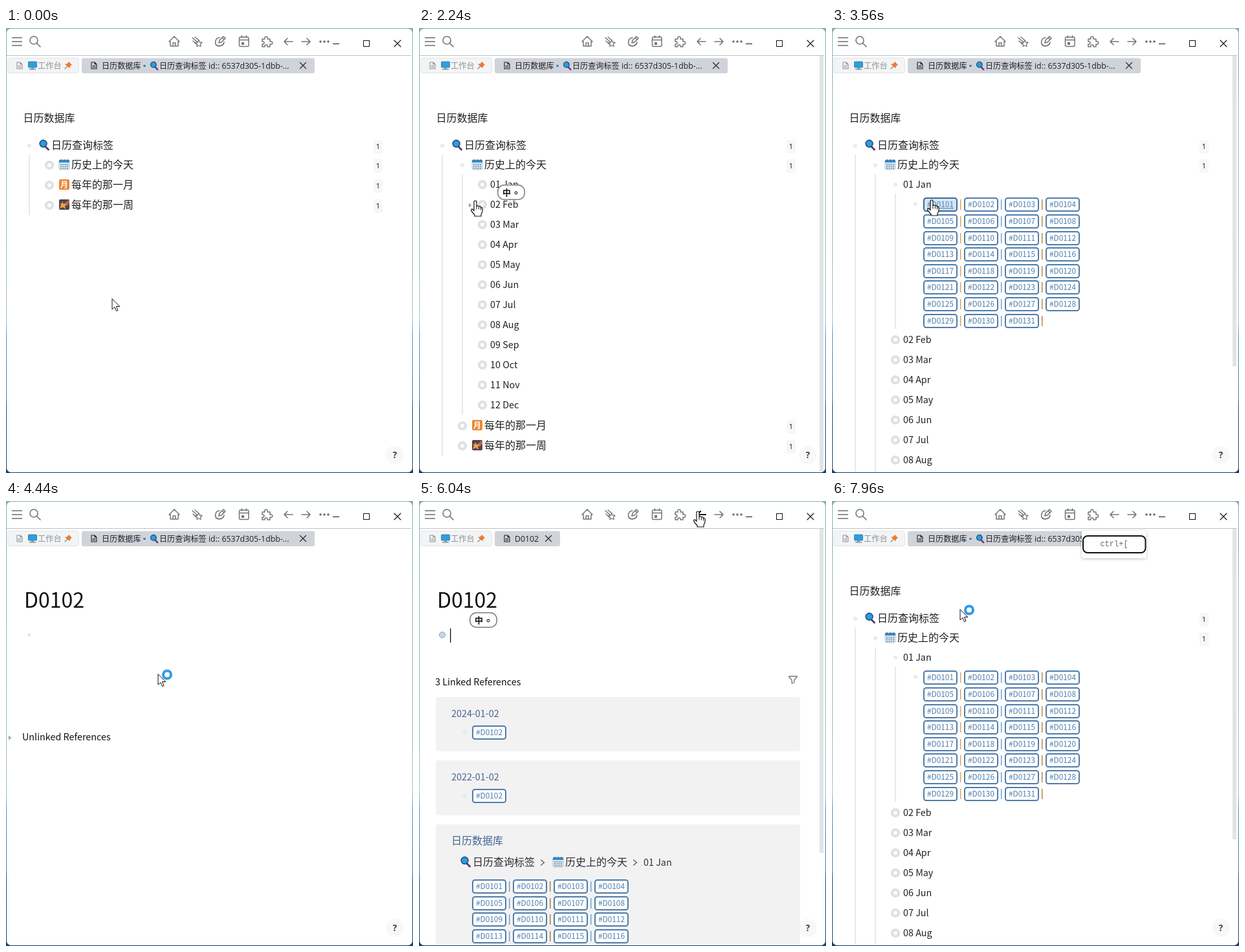
Write an HTML page with a canvas that moves like this. It is 629 by 688 pixels and loops after 8000 ms.

```html
<!DOCTYPE html>
<html lang="zh-CN">
<head>
<meta charset="utf-8">
<style>
html, body { margin: 0; width: 100%; height: 100%; overflow: hidden; background: #fff; }
canvas { display: block; width: 629px; height: 688px; }
</style>
</head>
<body>
<canvas id="stage" width="629" height="688"></canvas>
<script>
const ctx = document.getElementById('stage').getContext('2d');
const LOOP = 8000;
const SANS = '"Noto Sans CJK SC", "Noto Sans CJK", sans-serif';
const UI = '"Open Sans", "Noto Sans CJK SC", sans-serif';
const LATIN = 14.35;
const GREY = '#757575', INK = '#202124', BLUE = '#4f7dab';
const MONTHS = 'Jan Feb Mar Apr May Jun Jul Aug Sep Oct Nov Dec'.split(' ');

const pad = n => String(n).padStart(2, '0');
const monthName = i => pad(i + 1) + ' ' + MONTHS[i];
const within = (t, a, b) => t >= a && t < b;

function text(s, x, y, size, color = INK, font = SANS, weight = 400, align = 'left') {
  ctx.font = `${weight} ${size}px ${font}`;
  ctx.fillStyle = color;
  ctx.textAlign = align;
  ctx.fillText(s, x, y);
}
function rect(x, y, w, h, color) {
  ctx.fillStyle = color;
  ctx.fillRect(x, y, w, h);
}
function box(x, y, w, h, r, fill, stroke, width = 1) {
  ctx.beginPath();
  ctx.roundRect(x, y, w, h, r);
  if (fill) { ctx.fillStyle = fill; ctx.fill(); }
  if (stroke) { ctx.strokeStyle = stroke; ctx.lineWidth = width; ctx.stroke(); }
}
function dot(x, y, r, fill, stroke, width = 1) {
  ctx.beginPath();
  ctx.arc(x, y, r, 0, 7);
  if (fill) { ctx.fillStyle = fill; ctx.fill(); }
  if (stroke) { ctx.strokeStyle = stroke; ctx.lineWidth = width; ctx.stroke(); }
}
// SVG path placed at x, y
function shape(d, x, y, fill, stroke, width = 1.5, scale = 1) {
  ctx.save();
  ctx.translate(x, y);
  ctx.scale(scale, scale);
  const p = new Path2D(d);
  ctx.lineJoin = ctx.lineCap = 'round';
  if (fill) { ctx.fillStyle = fill; ctx.fill(p); }
  if (stroke) { ctx.strokeStyle = stroke; ctx.lineWidth = width; ctx.stroke(p); }
  ctx.restore();
}

// Small pictograms, centred on x, y
function magnifier(x, y, s = 1) {
  shape('M2.5 3L6.5 7', x, y, null, '#5b3f73', 3, s);
  shape('M4-2.2A5.4 5.4 0 1 1-6.8-2.2A5.4 5.4 0 1 1 4-2.2Z', x, y, '#279ee0', '#234c7d', 1.6, s);
}
function calendar(x, y) {
  box(x - 8, y - 7, 16, 15, 2, '#dceaf4', '#a8bccb', .8);
  rect(x - 8, y - 7, 16, 4, '#2f8fd0');
  for (let i = 0; i < 12; i++)
    rect(x - 6 + (i % 4) * 3.3, y - 1 + Math.floor(i / 4) * 3, 2, 1.8, '#7894a8');
  for (const dx of [-5, 0, 5]) rect(x + dx - .5, y - 8, 1.2, 3, '#52616c');
}
function monthBadge(x, y) {
  box(x - 8, y - 8, 16, 16, 2, '#ef8730');
  text('月', x, y + 4.5, 12, '#fff', SANS, 700, 'center');
}
function shootingStar(x, y) {
  box(x - 8, y - 8, 16, 16, 2, '#51405f');
  shape('M0-2L8-8V-2L3 3Z', x, y, '#b8673d');
  shape('M-3-5L-1-1L4-1L1 2L2 7L-2 4L-7 6L-5 1L-7-2L-4-1Z', x, y, '#f5a435');
}
function computer(x, y) {
  box(x - 6.5, y - 6, 13, 9, 1, '#2c9fe0', '#3d7190', .8);
  rect(x - 2, y + 3, 4, 2, '#8a9aa4');
  rect(x - 5, y + 5, 10, 1.5, '#7197ae');
}
function pin(x, y) {
  shape('M-1 1L-5 5', x, y, null, '#888', 1.2);
  shape('M1-6L6-1L4 0L2 4L-5-2L-1-3Z', x, y, '#ed7b32');
}
const page = (x, y, c) =>
  shape('M-4-5H1L4-2V5H-4ZM1-5V-2H4M-2 .5H2M-2 2.7H2', x, y, null, c, 1.1);

function bullet(x, y, collapsed) {
  if (collapsed) dot(x, y, 5.1, '#fbfbfc', '#dee0e5', 4);
  else dot(x, y, 3, '#e9eaed');
}
function count(y) {
  box(568, y - 10, 14, 21, 3, '#f7f7f7');
  text('1', 575, y + 4, 11, '#111', UI, 400, 'center');
}
function topic(icon, label, x, y, collapsed) {
  bullet(x, y + 1, collapsed);
  icon(x + 23, y);
  text(label, x + 34, y + 6, 16);
  count(y + 2);
}
function month(i, y, collapsed = true) {
  bullet(98, y, collapsed);
  text(monthName(i), 110, y + 5, LATIN);
}
function tag(day, x, y, hover) {
  box(x + 1, y - 10, 51, 20, 3.5, hover ? '#d6e6f2' : '#fff', hover ? '#3c6b9d' : BLUE, 2);
  text('#D01' + pad(day), x + 26.5, y + 4, 11.85, BLUE, SANS, 400, 'center');
  if (hover) rect(x + 6, y + 5.5, 41, 1, BLUE);
}
function tagGrid(x, y, days, bars, hover) {
  for (let i = 0; i < days; i++) {
    const cx = x + (i % 4) * 63, cy = Math.round(y + Math.floor(i / 4) * 25.6);
    tag(i + 1, cx, cy, hover === i + 1);
    if (i % 4 < 3) rect(cx + 57, cy - 8, 1.4, 16, bars[i % 4]);
  }
}
const guide = (x, top, bottom) => rect(x - 1, top, 2, bottom - top, '#e9e9eb');
const thumb = bottom => rect(619, 43, 6, bottom - 43, '#e2e3e5');
const triangle = (x, y, open) =>
  shape(open ? 'M-3-2H3L0 3Z' : 'M-2-3.5V3.5L2.5 0Z', x, y, '#a5a5a8');

function databasePage(level, t) {
  text('日历数据库', 26.5, 145, 16);
  guide(36, 196, [289, 661, 687][level]);
  bullet(36, 182);
  magnifier(59, 181);
  text('日历查询标签', 70, 187, 16);
  count(183);
  topic(calendar, '历史上的今天', 67, 211, level === 0);
  if (level < 2) {
    const y = level ? 614 : 242;
    topic(monthBadge, '每年的那一月', 67, y, true);
    topic(shootingStar, '每年的那一周', 67, y + 31, true);
  }
  if (level) guide(67, 226, level === 1 ? 598 : 687);
  if (level === 1) {
    for (let i = 0; i < 12; i++) month(i, 242 + i * 31);
    thumb(685);
  }
  if (level === 2) {
    month(0, 242, false);
    guide(98, 256, 465);
    bullet(129, 272);
    const hover = within(t, 3480, 3850) ? 1 : within(t, 3920, 4250) ? 2 : 0;
    tagGrid(141, 273.4, 31, ['#dfa04a', '#6a9bcb', '#b08434'], hover);
    for (let i = 1; i < 8; i++) month(i, 451 + i * 31);
    thumb(523);
  }
}

function tagPage(t) {
  text('D0102', 28, 165, 32, '#111', SANS, 300);
  const editing = t >= 4870;
  if (editing) {
    dot(36, 207, 4.5, '#c5d8ef', '#8197bb', 1);
    if (Math.floor((t - 4870) / 530) % 2 === 0) rect(48, 197, 1.3, 22, '#111');
  } else dot(36, 207, 2.7, '#e6e7ea');
  if (t < 4620) {
    triangle(6, 366);
    text('Unlinked References', 25, 370, LATIN, '#111');
    return;
  }
  const loaded = t >= 5010;
  text('3 Linked References', 25, 285, LATIN, '#111');
  shape('M-6-5H6V-4L1.8 1V4.5L-1.8 6V1L-6-4Z', 578, 276, null, GREY, 1.3);
  [[303, 84], [401, 85], [500, 187]].forEach(([y, h]) => box(26, y, 563, h, 4, '#f2f2f2'));
  [['2024-01-02', 329], ['2022-01-02', 427]].forEach(([date, y]) => {
    text(date, 50, y + 5, LATIN, '#48638e');
    if (loaded) { bullet(70, y + 29); tag(2, 82, y + 29); }
  });
  text('日历数据库', 50, 531, 16, '#45658f');
  thumb(loaded ? 544 : 640);
  if (!loaded) return;
  magnifier(72, 558);
  text('日历查询标签', 83, 564, 16, '#2d3037');
  calendar(215, 558);
  text('历史上的今天', 226, 564, 16, '#2d3037');
  for (const x of [191, 334]) shape('M-2.5-4L2.5 0L-2.5 4', x, 559, null, '#555', 1.3);
  text('01 Jan', 347, 564, LATIN, '#2d3037');
  tagGrid(82, 596, 16, ['#6d9dca', '#b4793c', '#6d9dca']);
}

function toolbar(t) {
  for (const y of [15, 21, 27]) rect(9, y - .75, 16, 1.6, GREY);
  dot(43, 19, 6, null, GREY, 1.6);
  shape('M47.5 23.5L53 29', 0, 0, null, GREY, 1.7);
  shape('M-8 0L0-8L8 0H6V7H-6V0ZM-2 7V2H2V7', 260, 21, null, GREY);
  shape('M-7-6L1 1M-3-7L3-2M-6-1L-1 4', 295, 21, null, GREY);
  shape('M3-2L4.5 1L8 1.5L5.5 4L6 7.5L3 6L0 7.5L.5 4L-2 1.5L1.5 1Z', 295, 21, '#fff', GREY, 1.3);
  shape('M-2 2L-1-2L5-8L8-5L2 1ZM-1-6C-7-6-8 0-7 4C-4 9 5 7 6 1M3-6L6-3', 331, 21, null, GREY, 1.6);
  box(360.5, 14, 14.5, 14.5, 2, null, GREY, 1.5);
  shape('M-7-2.5H7M-3.5-9V-6M3.5-9V-6', 368, 21, null, GREY);
  rect(364, 22, 4, 4, GREY);
  shape('M-7-4H-3C-5-9 3-9 1-4H5V0C10-2 10 6 5 4V8H1C2 4-4 4-3 8H-7V4C-3 5-3-1-7 0Z', 403, 21, null, GREY);
  const hot = within(t, 5950, 7780);
  shape('M7 0H-6M-1-5L-6 0L-1 5', 436, 21, null, hot ? '#111' : GREY, hot ? 2.2 : 1.6);
  shape('M-7 0H6M1-5L6 0L1 5', 464, 21, null, GREY, 1.6);
  for (const x of [486, 492, 498]) dot(x, 21, 1.7, '#666');
  rect(505, 24, 10, 1, '#111');
  ctx.strokeStyle = '#111';
  ctx.lineWidth = 1;
  ctx.strokeRect(552.5, 19.5, 9, 9);
  shape('M600 19L610 29M610 19L600 29', 0, 0, null, '#111', 1.1);
  rect(1, 42, 625, 1, '#bfc1c3');
}

function tabs(t) {
  box(2.5, 46.5, 110, 23, 3, '#f3f4f5', '#e3e4e6');
  page(21, 58, '#909398');
  computer(41, 58);
  text('工作台', 49, 63, 12.3, '#8d9198');
  pin(96, 58);
  const short = within(t, 4750, 7150);
  box(117, 46.5, short ? 101 : 360, 23.5, 3, '#d0d3da');
  page(136, 58, '#222');
  if (short) text('D0102', 148, 63, 12.3, INK, UI);
  else {
    text('日历数据库', 148, 63, 12.1);
    dot(214, 58.5, 1.8, '#2982b8');
    magnifier(229, 58.5, .8);
    text('日历查询标签', 237, 63, 12.1);
    text('id:: 6537d305-1dbb-...', 313, 63, 12.3, INK, UI);
  }
  shape('M-4.5-4.5L4.5 4.5M4.5-4.5L-4.5 4.5', short ? 200 : 459, 58, null, '#333', 1.4);
}

function desktop() {
  const g = ctx.createLinearGradient(0, 0, 0, 688);
  [[0, '#86aeb3'], [.66, '#9fc0cc'], [.69, '#4d92c2'], [.83, '#3b7aab'], [.85, '#1f4a78'], [1, '#1c3f68']]
    .forEach(([p, c]) => g.addColorStop(p, c));
  rect(0, 0, 629, 688, g);
  box(1, 1, 627, 686, 7, '#fff');
}

function helpButton() {
  dot(601, 660, 14, '#f8f8f9');
  text('?', 601, 665, 13.5, '#3e3e40', UI, 700, 'center');
}
function inputBadge(x, y) {
  box(x + .75, y + .75, 41.5, 22.5, 10, '#fff', '#7d7f7a', 1.5);
  text('中', x + 8, y + 17, 13, '#111', SANS, 700);
  dot(x + 29, y + 13, 1.9, null, '#222', 1.1);
}
function keyHint() {
  ctx.save();
  ctx.shadowColor = 'rgba(0,0,0,.25)';
  ctx.shadowBlur = 4;
  ctx.shadowOffsetY = 1;
  box(386, 46, 100, 42.5, 3, '#fff');
  ctx.restore();
  box(388, 54, 96.5, 26, 7, '#fff', '#111', 2);
  text('ctrl+[', 436, 70, 12, '#666', '"Liberation Mono", monospace', 400, 'center');
}

// Pointer stops: time, x, y
const PATH = [
  [0, 164, 419], [70, 164, 419], [330, 53, 212], [530, 53, 212], [600, 52, 216],
  [1000, 52, 216], [1560, 72, 244], [1690, 72, 244], [2200, 87, 267], [2380, 86, 270],
  [2520, 86, 270], [2750, 80, 241], [3290, 82, 243], [3540, 154, 266], [3750, 156, 267],
  [4050, 235, 268], [5290, 235, 268], [6000, 431, 16], [6110, 431, 16],
  [6580, 437, 16], [7720, 438, 16], [7950, 198, 168], [LOOP, 198, 168]
];
const HAND = [[300, 1000], [1640, 2500], [2680, 3350], [3440, 4260], [5930, 7750]];
const BUSY = [[4300, 4870], [7860, LOOP]];

function pointerAt(t) {
  const i = PATH.findIndex(p => p[0] > t);
  const [t0, x0, y0] = PATH[i - 1], [t1, x1, y1] = PATH[i];
  const k = (t - t0) / (t1 - t0), e = k * k * (3 - 2 * k);
  return [Math.round(x0 + (x1 - x0) * e), Math.round(y0 + (y1 - y0) * e)];
}
function pointer(t) {
  const [x, y] = pointerAt(t);
  const active = list => list.some(([a, b]) => within(t, a, b));
  if (active(HAND)) {
    shape('M-2 2Q-2 0 0 0Q2 0 2 2V8.5Q4 7 5.5 9Q8 8 8.5 10.5Q11 10 11 12.5V17L9 21V24H-1V22L-6 16Q-7 12.5-4.5 13L-2 15.5Z',
      x, y, '#fff', '#111', 1.2);
    shape('M2 9V13M5.5 10V13M8.5 11V14', x, y, null, '#111', 1);
  } else {
    shape('M0 0V16L4 12.5L6.5 18.5L9 17.5L6.5 11.5H11.5Z', x, y, '#fff', '#111', 1);
    if (active(BUSY)) dot(x + 14, y + .5, 6, '#fff', '#319be4', 4);
  }
}

function draw(t) {
  desktop();
  ctx.save();
  ctx.beginPath();
  ctx.roundRect(1, 1, 627, 686, 7);
  ctx.clip();
  if (within(t, 4270, 6830)) tagPage(t);
  else databasePage(t < 800 ? 0 : t < 2800 ? 1 : 2, t);
  toolbar(t);
  tabs(t);
  helpButton();
  if (within(t, 300, 1100)) triangle(47, 212, t >= 800);
  if (within(t, 1900, 2520)) triangle(79, 274);
  if (within(t, 2600, 3360)) triangle(79, 242, t >= 2800);
  if (within(t, 1200, 2600)) inputBadge(121, 242);
  if (within(t, 4870, 6250)) inputBadge(78, 172);
  if (t >= 7300) keyHint();
  pointer(t);
  ctx.restore();
}

const start = performance.now();
function frame() {
  draw((performance.now() - start) % LOOP);
  requestAnimationFrame(frame);
}
frame();
</script>
</body>
</html>
```
